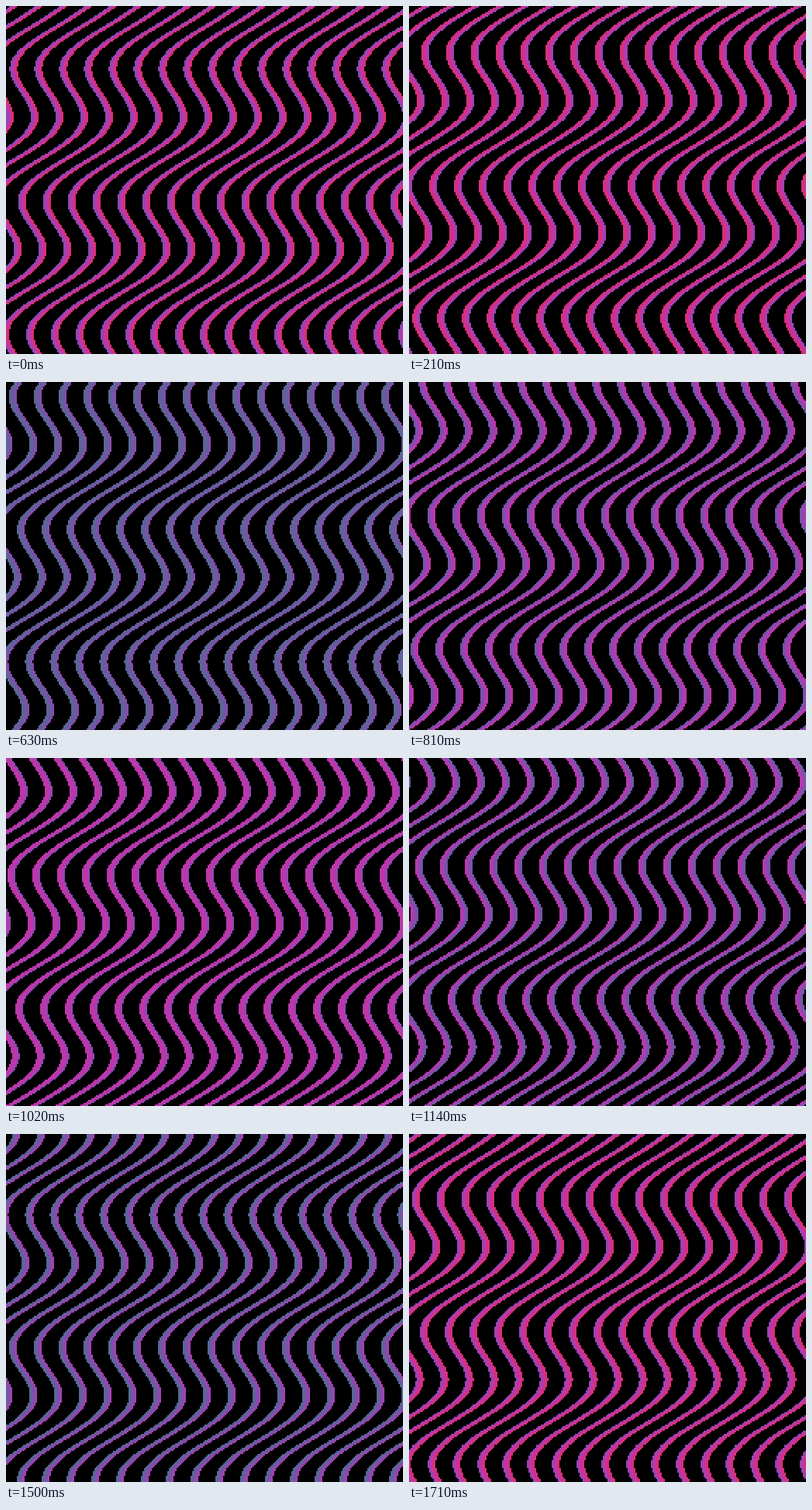
Write an HTML page with a canvas that moves like this. It is 512 px wide and 448 px high and loops after 1740 ms.

```html
<!DOCTYPE html>
<html lang="en">
<head>
<meta charset="utf-8">
<title>Waves</title>
<style>
html, body { margin: 0; width: 100%; height: 100%; overflow: hidden; background: #000; }
canvas { display: block; width: 512px; height: 448px; image-rendering: pixelated; }
</style>
</head>
<body>
<canvas id="stage" width="256" height="224"></canvas>
<script>
const W = 256, H = 224, STEP = 30, STEPS = 58;
const PITCH = 16, BAND = 5, START = 4.85, SLOPE = 0.5;
const AMP = 16, FREQ = Math.PI * 2 / (256 / 3), PHASE = 2.205;
const CYCLE = 28, PEAKS = [1, 0.8];
const RAMP = [[84, 106, 146], [124, 80, 172], [184, 56, 180], [222, 46, 108]];

const ctx = document.getElementById("stage").getContext("2d");
const image = ctx.createImageData(W, H);
const pixels = new Uint32Array(image.data.buffer);
const mod = (a, n) => ((a % n) + n) % n;
const pack = ([r, g, b]) => (255 << 24 | b << 16 | g << 8 | r) >>> 0;
const BLACK = pack([0, 0, 0]);

// The ramp climbs from slate and falls back, to red and to magenta in turn.
function rampColor(u) {
  const peak = PEAKS[mod(Math.floor(u), PEAKS.length)];
  const v = (1 - Math.abs(2 * mod(u, 1) - 1)) * peak * 3;
  const i = Math.min(2, Math.floor(v));
  return pack(RAMP[i].map((c, k) => Math.round(c + (RAMP[i + 1][k] - c) * (v - i))));
}

function draw(n) {
  const colors = [];
  for (let i = 0; i < BAND; i++) colors.push(rampColor(0.2 + n / CYCLE + i * 0.075));
  const phase = PHASE + n * Math.PI * 2 / STEPS;
  for (let y = 0; y < H; y++) {
    const shift = Math.round(AMP * Math.sin(FREQ * y + phase) - SLOPE * y + START);
    for (let x = 0; x < W; x++) {
      const d = mod(x - shift, PITCH);
      pixels[y * W + x] = d < BAND ? colors[d] : BLACK;
    }
  }
  ctx.putImageData(image, 0, 0);
}

const begin = performance.now();
let last = 0;
function tick() {
  const n = Math.floor((performance.now() - begin) / STEP) % STEPS;
  if (n !== last) draw(last = n);
  requestAnimationFrame(tick);
}
draw(0);
requestAnimationFrame(tick);
</script>
</body>
</html>
```
